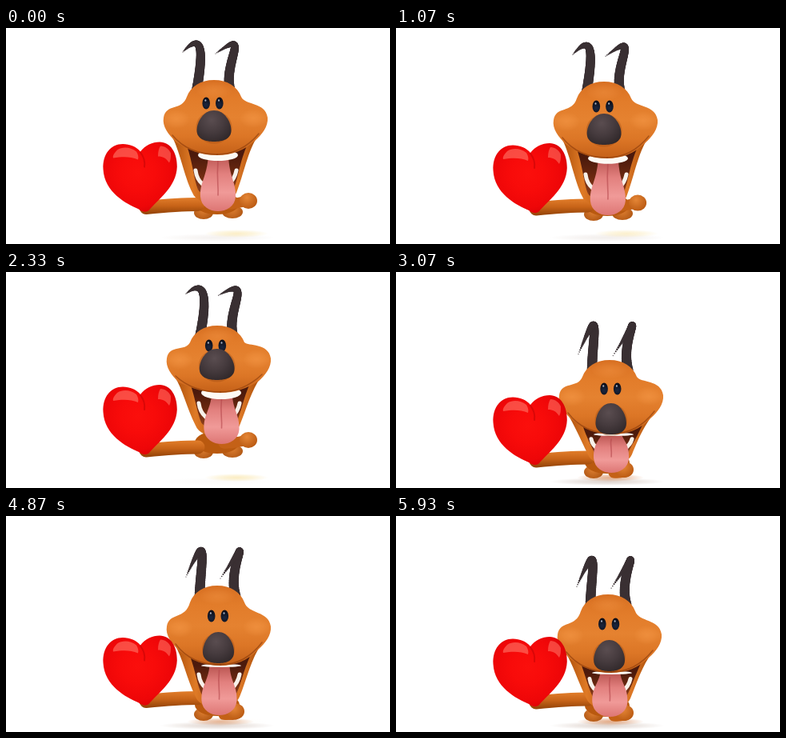
Write an HTML page with a canvas that moves like this. It is 480 by 270 pixels and loops after 5.99 s.

```html
<!DOCTYPE html>
<html lang="en">
<head>
<meta charset="utf-8">
<title>Hopping dog with a heart</title>
<style>
html, body { margin: 0; width: 100%; height: 100%; overflow: hidden; background: #fff; }
canvas { display: block; width: 100vw; height: 100vh; }
</style>
</head>
<body>
<canvas id="stage" width="480" height="270"></canvas>
<script>
const ctx = document.getElementById('stage').getContext('2d');
const LOOP = 5990, FPS = 15, HOP_FPS = 25, HOP = 14;
const DARK = '#3a3033';

// One hop of 14 ticks: tick, then the values named in FIELDS
const FIELDS = ['x', 'top', 'eye', 'nose', 'cheek', 'lip', 'tongue', 'feet', 'heart', 'droop'];
const KEYS = [
  [0, 260, 65, 94, 123, 113, 159, 229, 239, 142.5, 0],
  [2, 261, 60, 83, 107, 103, 145, 212, 230, 138, -0.3],
  [3, 264, 67, 92, 116, 109, 151, 215, 233, 141, -0.2],
  [7, 267, 110, 146, 184, 155, 203, 251, 258, 154, 1.15],
  [9, 265, 98, 135, 175, 149, 196, 251, 257, 151, 1.05],
  [10, 264, 87, 125, 165, 139, 187, 249, 256, 149.5, 1],
  [13, 260, 67, 98, 127, 116, 163, 234, 241, 144, 0.05]
];

function key(i) {
  const n = KEYS.length, turn = Math.floor(i / n);
  const k = KEYS[i - turn * n];
  return [k[0] + turn * HOP, ...k.slice(1)];
}

// Smooth cyclic curve through the keys
function poseAt(tick) {
  const t = tick % HOP;
  let i = KEYS.length - 1;
  while (KEYS[i][0] > t) i--;
  const [a, b, c, d] = [key(i - 1), key(i), key(i + 1), key(i + 2)];
  const span = c[0] - b[0], u = (t - b[0]) / span;
  const pose = {};
  FIELDS.forEach((name, n) => {
    const j = n + 1;
    const mb = (c[j] - a[j]) / (c[0] - a[0]) * span;
    const mc = (d[j] - b[j]) / (d[0] - b[0]) * span;
    const gap = c[j] - b[j];
    pose[name] = b[j] + u * (mb + u * (3 * gap - 2 * mb - mc + u * (mb + mc - 2 * gap)));
  });
  return pose;
}

function fillStops(g, stops) {
  stops.forEach((c, i) => g.addColorStop(i / (stops.length - 1), c));
  return g;
}
const radial = (x, y, r, ...stops) => fillStops(ctx.createRadialGradient(x, y, 0, x, y, r), stops);
const linear = (x0, y0, x1, y1, ...stops) => fillStops(ctx.createLinearGradient(x0, y0, x1, y1), stops);

function oval(x, y, rx, ry, fill) {
  ctx.beginPath();
  ctx.ellipse(x, y, rx, ry, 0, 0, Math.PI * 2);
  ctx.fillStyle = fill;
  ctx.fill();
}

// Closed path: start point, then cubic segments of six numbers
function shape(start, curves, fill) {
  ctx.beginPath();
  ctx.moveTo(...start);
  curves.forEach(c => ctx.bezierCurveTo(...c));
  ctx.closePath();
  ctx.fillStyle = fill;
  ctx.fill();
}

function curve(start, bend, width, color) {
  ctx.beginPath();
  ctx.moveTo(...start);
  ctx.bezierCurveTo(...bend);
  ctx.lineWidth = width;
  ctx.lineCap = 'round';
  ctx.strokeStyle = color;
  ctx.stroke();
}

function softOval(x, y, rx, ry, rgb, alpha) {
  ctx.save();
  ctx.translate(x, y);
  ctx.scale(1, ry / rx);
  oval(0, 0, rx, rx, radial(0, 0, rx, `rgba(${rgb},${alpha})`, `rgba(${rgb},${alpha * 0.6})`, `rgba(${rgb},0)`));
  ctx.restore();
}

function drawShadow(lift) {
  softOval(264, 262, 72, 5, '150,115,95', 0.3 * (1 - lift));
  softOval(268, 257, 42, 5, '200,90,20', 0.5 * Math.max(0, 1 - lift * 3));
  softOval(288, 257, 40, 5, '246,214,120', 0.45 * Math.min(1, lift * 1.4));
}

function drawBody(p, lift) {
  const armY = p.heart + 78;
  const out = Math.min(1, lift * 1.6);
  const pawX = 286 + 17 * out;
  const pawY = p.feet - 11 - 12 * out;
  oval(247, p.feet - 8, 12, 8, radial(246, p.feet - 12, 16, '#e08032', '#a8500f'));
  oval(283, p.feet - 9, 13, 8, radial(283, p.feet - 13, 17, '#e08032', '#a8500f'));
  oval(264, p.feet - 20, 28, 14, '#b9590f');
  curve([272, pawY + 4], [282, pawY + 5, 290, pawY + 2, pawX, pawY], 13, '#c46117');
  oval(pawX, pawY, 11, 10, radial(pawX - 2, pawY - 4, 14, '#e58636', '#bc5c14'));
  curve([175, armY + 4], [195, armY + 2, 220, armY, 240, armY], 17,
    linear(0, armY - 8, 0, armY + 11, '#e07c2a', '#c86418', '#984609'));
}

// Tapered hook from the base: three points relative to it
function drawEar(x, y, p1, p2, tip) {
  const at = (n, t) => {
    const s = 1 - t;
    return 3 * s * s * t * p1[n] + 3 * s * t * t * p2[n] + t * t * t * tip[n];
  };
  for (let i = 0; i <= 80; i++) {
    const t = i / 80, r = (5.7 - 1.3 * t) * (1 - t ** 4) + 0.6;
    oval(x + at(0, t), y + at(1, t), r, r, DARK);
  }
}

function drawEars({ x, top, droop }) {
  const base = top + 15 - droop * 2;
  const p1y = -35 - 5 * droop, p2y = -82 - 9 * droop, tipY = -50 + 26 * droop;
  drawEar(x - 22, base, [6 - 5 * droop, p1y], [13, p2y], [-17, tipY]);
  drawEar(x + 21 + 2 * droop, base, [-12, p1y], [29, p2y], [-19, tipY + 2]);
}

function drawMouth({ x, cheek, lip, tongue: end, droop }) {
  const low = end - 25;
  shape([x - 54, cheek + 20], [
    [x - 43, cheek + 38, x - 38, low - 20, x - 27, low + 2],
    [x - 20, low + 20, x + 20, low + 20, x + 28, low + 2],
    [x + 37, low - 20, x + 42, cheek + 40, x + 56, cheek + 20]
  ], linear(x - 46, 0, x + 48, 0, '#b95a12', '#df7a26', '#c4631a', '#c4631a', '#dd7826', '#b4560f'));
  shape([x - 34, lip - 12], [
    [x - 27, lip + 8, x - 25, low - 14, x - 20, low - 2],
    [x - 15, low + 8, x + 19, low + 8, x + 24, low - 2],
    [x + 30, low - 14, x + 32, lip + 8, x + 42, lip - 14]
  ], linear(0, lip, 0, low, '#4c1a0c', '#6a2810', '#8a3d1a'));
  const rim = Math.min(26, (low - lip) * 0.75);
  curve([x - 23, low - rim], [x - 19, low + 5, x + 22, low + 5, x + 28, low - rim], 5, '#f7f1ea');

  const mid = Math.max(lip + 8, end - 36), cx = x + 5 - 2.5 * droop;
  shape([cx - 12, lip], [
    [cx - 14, mid - 6, cx - 23, mid, cx - 22, end - 18],
    [cx - 20, end + 6, cx + 20, end + 6, cx + 22, end - 18],
    [cx + 23, mid, cx + 14, mid - 6, cx + 13, lip]
  ], linear(0, lip, 0, end, '#b95450', '#e2807e', '#f09a98', '#dd7674'));
  curve([cx, lip + 6], [cx - 2, mid, cx + 1, mid + 4, cx, end - 20], 1.6, 'rgba(180,70,75,.6)');
  oval(x + 5, lip, 25, Math.max(2, 7 - 5 * droop), '#fdfaf5');
}

function drawHead({ x, top, eye, nose, cheek, lip, droop }) {
  shape([x, top], [
    [x + 17, top, x + 29, top + 8, x + 34, top + 21],
    [x + 39, cheek - 16, x + 64, cheek - 21, x + 67, cheek - 1],
    [x + 68, cheek + 10, x + 60, cheek + 20, x + 51, cheek + 28],
    [x + 38, lip - 6, x + 22, lip, x + 4, lip],
    [x - 16, lip, x - 32, lip - 6, x - 48, cheek + 29],
    [x - 57, cheek + 20, x - 65, cheek + 10, x - 63, cheek - 1],
    [x - 60, cheek - 19, x - 40, cheek - 9, x - 34, top + 21],
    [x - 29, top + 8, x - 17, top, x, top]
  ], linear(0, top, 0, lip, '#d87022', '#e27c2a', '#e58230', '#dc7626', '#c46018'));
  softOval(x - 47, cheek + 1, 17, 12, '255,164,84', 0.35);
  softOval(x + 49, cheek, 17, 12, '255,164,84', 0.35);
  softOval(x, top + 13, 23, 11, '255,164,84', 0.28);
  curve([x - 52, cheek + 21], [x - 38, lip - 8, x - 18, lip - 1, x + 4, lip - 1], 1.6, 'rgba(125,48,5,.5)');
  curve([x + 56, cheek + 19], [x + 40, lip - 8, x + 22, lip - 1, x + 4, lip - 1], 1.6, 'rgba(125,48,5,.5)');

  for (const side of [-8.3, 8.3]) {
    const ex = x - 1.5 + side + 2.5 * droop;
    oval(ex, eye, 4.8, 7.6, radial(ex, eye + 2, 8, '#1c2740', '#0c0e18'));
    oval(ex - 0.8, eye - 3.5, 1, 1.3, '#a9b4c6');
  }

  const nx = x + 1.5 * droop, w = 21.5 - 2 * droop;
  oval(nx, nose + 1, w + 1, 20.5, 'rgba(125,52,10,.25)');
  shape([nx, nose - 20], [
    [nx + w * 0.6, nose - 20, nx + w, nose - 6, nx + w, nose + 5],
    [nx + w, nose + 16, nx + w * 0.5, nose + 19, nx, nose + 19],
    [nx - w * 0.5, nose + 19, nx - w, nose + 16, nx - w, nose + 5],
    [nx - w, nose - 6, nx - w * 0.6, nose - 20, nx, nose - 20]
  ], radial(nx - 3, nose - 8, 31, '#5a4d50', '#463b3e', '#2e2628'));
}

function drawHeart(y) {
  shape([168, y + 12], [
    [174, y + 4, 183, y, 192, y],
    [206, y, 214, y + 14, 213.8, y + 31],
    [213, y + 56, 190, y + 72, 179, y + 85],
    [176, y + 88, 171, y + 88, 166, y + 84],
    [150, y + 77, 123, y + 63, 121.5, y + 34],
    [120.5, y + 15, 131, y + 2.5, 146, y + 2.5],
    [155, y + 2.5, 163, y + 6, 168, y + 12]
  ], radial(165, y + 38, 64, '#fb0f0c', '#f80b0a', '#ee0608', '#c40006'));
  curve([168, y + 13], [172, y + 18, 174, y + 24, 173, y + 31], 2, 'rgba(170,0,4,.4)');
  shape([139, y + 10], [
    [147, y + 5, 156, y + 7, 163, y + 12],
    [165, y + 15, 166, y + 19, 165, y + 22],
    [156, y + 18, 146, y + 18, 134, y + 20],
    [133, y + 17, 136, y + 13, 139, y + 10]
  ], 'rgba(255,120,105,.6)');
  shape([193, y + 5], [
    [199, y + 5, 204, y + 9, 206, y + 14],
    [206, y + 19, 206, y + 22, 204, y + 26],
    [200, y + 20, 196, y + 18, 190, y + 18],
    [190, y + 12, 191, y + 8, 193, y + 5]
  ], 'rgba(255,120,105,.55)');
}

function draw(tick) {
  const p = poseAt(tick);
  const lift = Math.max(0, Math.min(1, (257 - p.feet) / 27));
  ctx.fillStyle = '#fff';
  ctx.fillRect(0, 0, 480, 270);
  drawShadow(lift);
  drawBody(p, lift);
  drawMouth(p);
  drawEars(p);
  drawHead(p);
  drawHeart(p.heart);
}

const begin = performance.now();
function play() {
  const time = (performance.now() - begin) % LOOP;
  const shown = Math.floor(time * FPS / 1000 + 0.1);
  draw(Math.ceil(shown * HOP_FPS / FPS - 0.01)); // the hop runs on whole ticks
  requestAnimationFrame(play);
}
play();
</script>
</body>
</html>
```
